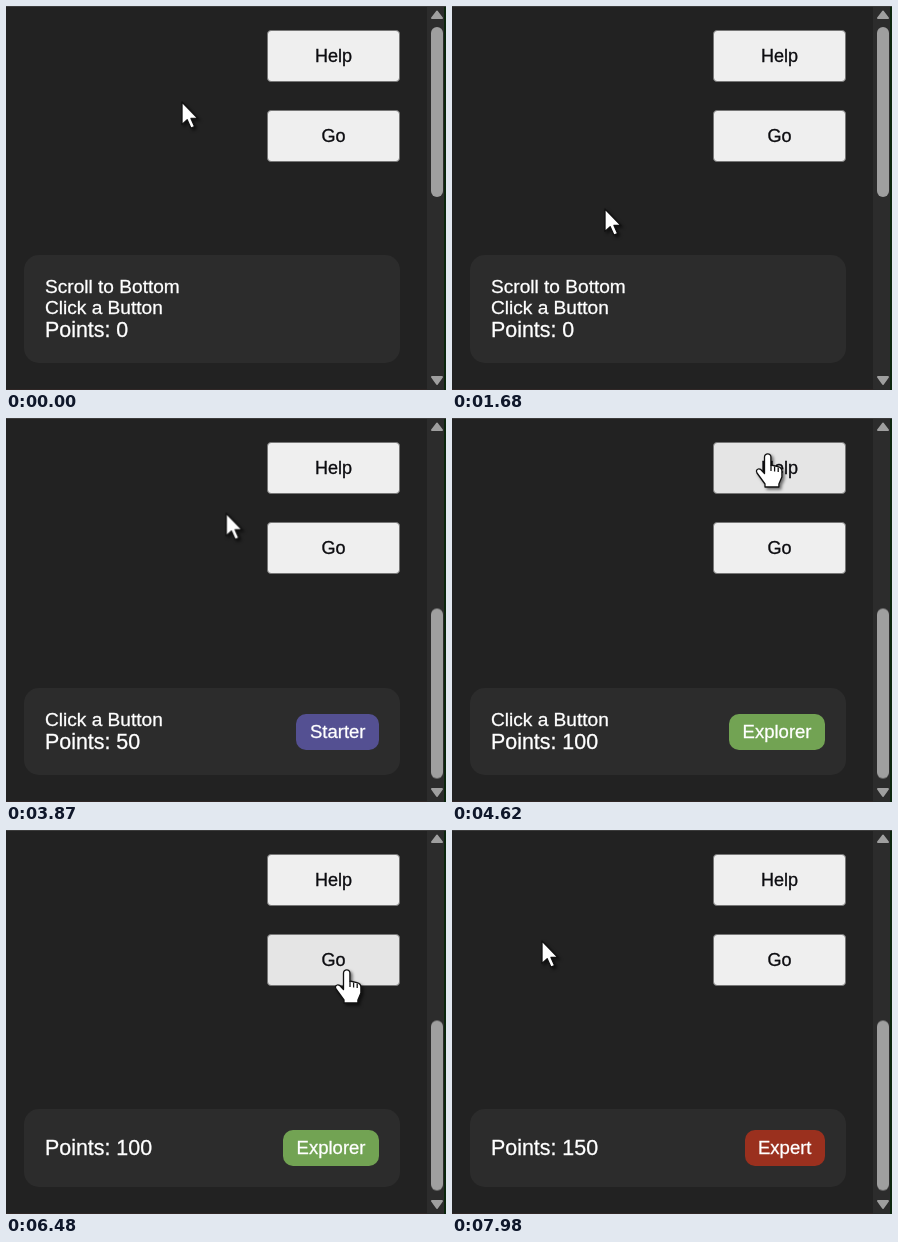
Animation, 440 px wide and 384 px high, one loop 8000 ms. Source, as an HTML page:

```html
<!DOCTYPE html>
<html lang="en">
<head>
<meta charset="utf-8">
<title>Points panel</title>
<style>
html, body { margin: 0; width: 100%; height: 100%; overflow: hidden; background: #222; }
* { box-sizing: border-box; }
body { position: relative; font-family: "Liberation Sans", Arial, sans-serif; color: #fff; -webkit-text-stroke: .3px; }
body * { animation: 8s linear infinite; }

.stage { position: absolute; left: 0; top: 0; width: 440px; height: 384px; overflow: hidden; border-top: 1px solid #3c3c3c; }
.edge { position: absolute; left: 438px; top: 0; width: 2px; height: 384px; background: #0b260d; }
.foot { position: absolute; left: 0; top: 382px; width: 438px; height: 1px; background: #302726; }

/* buttons */
.button {
  position: absolute; left: 261px; width: 133px; height: 52px;
  border: 1.5px solid #777; border-radius: 4px; background: #efefef;
  color: #0c0c10; font-size: 18px; line-height: 51px; text-align: center;
  animation-timing-function: step-end;
}
.help { top: 23px; animation-name: hover-help; }
.go { top: 103px; animation-name: hover-go; }
@keyframes hover-help { 0%, 64.4% { background: #efefef } 51.9% { background: #e5e5e5 } }
@keyframes hover-go { 0%, 87.2% { background: #efefef } 78% { background: #e5e5e5 } }

/* scrollbar */
.track { position: absolute; left: 421px; top: 0; width: 17px; height: 383px; background: #2c2c2c; }
.thumb { position: absolute; left: 4px; top: 20px; width: 12px; height: 170px; border-radius: 6px; background: #9f9f9f; animation-name: scroll; }
.track svg { position: absolute; left: 0; top: -1px; }
@keyframes scroll {
  0%, 21.9% { transform: none; animation-timing-function: ease-in-out }
  29.6%, 100% { transform: translateY(169.5px) }
}

/* panel */
.panel {
  position: absolute; left: 18px; bottom: 27px; width: 376px; padding: 21px;
  border-radius: 15px; background: #2c2c2c;
}
.list { min-height: 36px; display: flex; flex-direction: column; justify-content: center; }
.task { height: 21px; line-height: 21px; font-size: 19.1px; flex: none; }
.scroll-task { animation-name: scroll-done; }
.click-task { animation-name: click-done; }
@keyframes scroll-done {
  0%, 33.25% { opacity: 1; height: 21px; animation-timing-function: ease-in-out }
  43.24% { opacity: 0; height: 21px }
  43.25%, 100% { opacity: 0; height: 0 }
}
@keyframes click-done {
  0%, 61.2% { opacity: 1; height: 21px; animation-timing-function: ease-in-out }
  71.2% { opacity: 0; height: 21px }
  71.21%, 100% { opacity: 0; height: 0 }
}
.points { position: relative; flex: none; height: 24px; line-height: 24px; font-size: 21.4px; white-space: pre; }
.points span { position: absolute; }
.badge {
  position: absolute; right: 21px; top: 50%; height: 36px; margin-top: -18px; padding: 0 13.5px;
  border-radius: 10px; font-size: 18.5px; line-height: 36px;
}
.starter { background: #545092; }
.explorer { background: #72a353; }
.expert { background: #9a301e; }

/* score levels */
.level0, .level1, .level2, .level3 { animation-timing-function: step-end; }
.level0 { animation-name: level0; }
.level1 { animation-name: level1; }
.level2 { animation-name: level2; }
.level3 { animation-name: level3; }
@keyframes level0 { 0% { opacity: 1 } 29.8%, 100% { opacity: 0 } }
@keyframes level1 { 0%, 57.5%, 100% { opacity: 0 } 29.8% { opacity: 1 } }
@keyframes level2 { 0%, 83.75%, 100% { opacity: 0 } 57.5% { opacity: 1 } }
@keyframes level3 { 0% { opacity: 0 } 83.75%, 100% { opacity: 1 } }

/* pointer */
.pointer {
  position: absolute; left: 0; top: 0; width: 1px; height: 1px; overflow: visible;
  filter: drop-shadow(2px 2px 1.5px #0008); animation-name: travel;
}
.pointer path { stroke: #111; stroke-width: 1.3; stroke-linejoin: round; fill: #fff; }
.arrow, .hand { animation-timing-function: step-end; }
.arrow { animation-name: arrow; }
.hand { animation-name: hand; }
@keyframes arrow { 0%, 64.4%, 87.2%, 100% { opacity: 1 } 51.9%, 78% { opacity: 0 } }
@keyframes hand { 0%, 64.4%, 87.2%, 100% { opacity: 0 } 51.9%, 78% { opacity: 1 } }
@keyframes travel {
  0% { transform: translate(176px, 95px) }
  10.5% { transform: translate(160px, 129px) }
  16.25% { transform: translate(132px, 185px) }
  21%, 30% { transform: translate(153px, 202px) }
  38.25% { transform: translate(157px, 178px) }
  40.5% { transform: translate(165px, 132px) }
  46.25% { transform: translate(200px, 102px) }
  51% { transform: translate(245px, 85px) }
  54.75%, 61.25% { transform: translate(316px, 35px) }
  65.6% { transform: translate(240px, 90px) }
  71.25%, 73.75% { transform: translate(115px, 193px) }
  79.75%, 85% { transform: translate(341px, 139px) }
  91.1% { transform: translate(116px, 112px) }
  95%, 100% { transform: translate(90px, 110px) }
}
</style>
</head>
<body>
<div class="stage">
  <div class="foot"></div>
  <div class="button help">Help</div>
  <div class="button go">Go</div>

  <div class="panel">
    <div class="list">
      <div class="task scroll-task">Scroll to Bottom</div>
      <div class="task click-task">Click a Button</div>
      <div class="points">Points: <span class="level0">0</span><span class="level1">50</span><span class="level2">100</span><span class="level3">150</span></div>
    </div>
    <div class="badge starter level1">Starter</div>
    <div class="badge explorer level2">Explorer</div>
    <div class="badge expert level3">Expert</div>
  </div>

  <div class="track">
    <svg width="17" height="384" fill="#9f9f9f" stroke="#9f9f9f" stroke-width="2" stroke-linejoin="round">
      <path d="M10 5.5L15 12H5zM10 378L15 371H5z"/>
    </svg>
    <div class="thumb"></div>
  </div>
  <div class="edge"></div>

  <svg class="pointer">
    <path class="arrow" d="M0 0V22.5L5.2 17.8L9 26.2L12.6 24.6L9 16.4H15.8Z"/>
    <g class="hand">
      <path d="M-3.5 3a3.2 3.2 0 0 1 6.4 0V11l7 1.6q4 1 4 4.4v6l-3 7v3H-3v-3l-8-11q-1.5-3 1.2-4 2-.6 4 2l2.3 2.5z"/>
      <path d="M3 11v6M6.6 12.5v5M10.2 13.5v4.5"/>
    </g>
  </svg>
</div>
</body>
</html>
```
